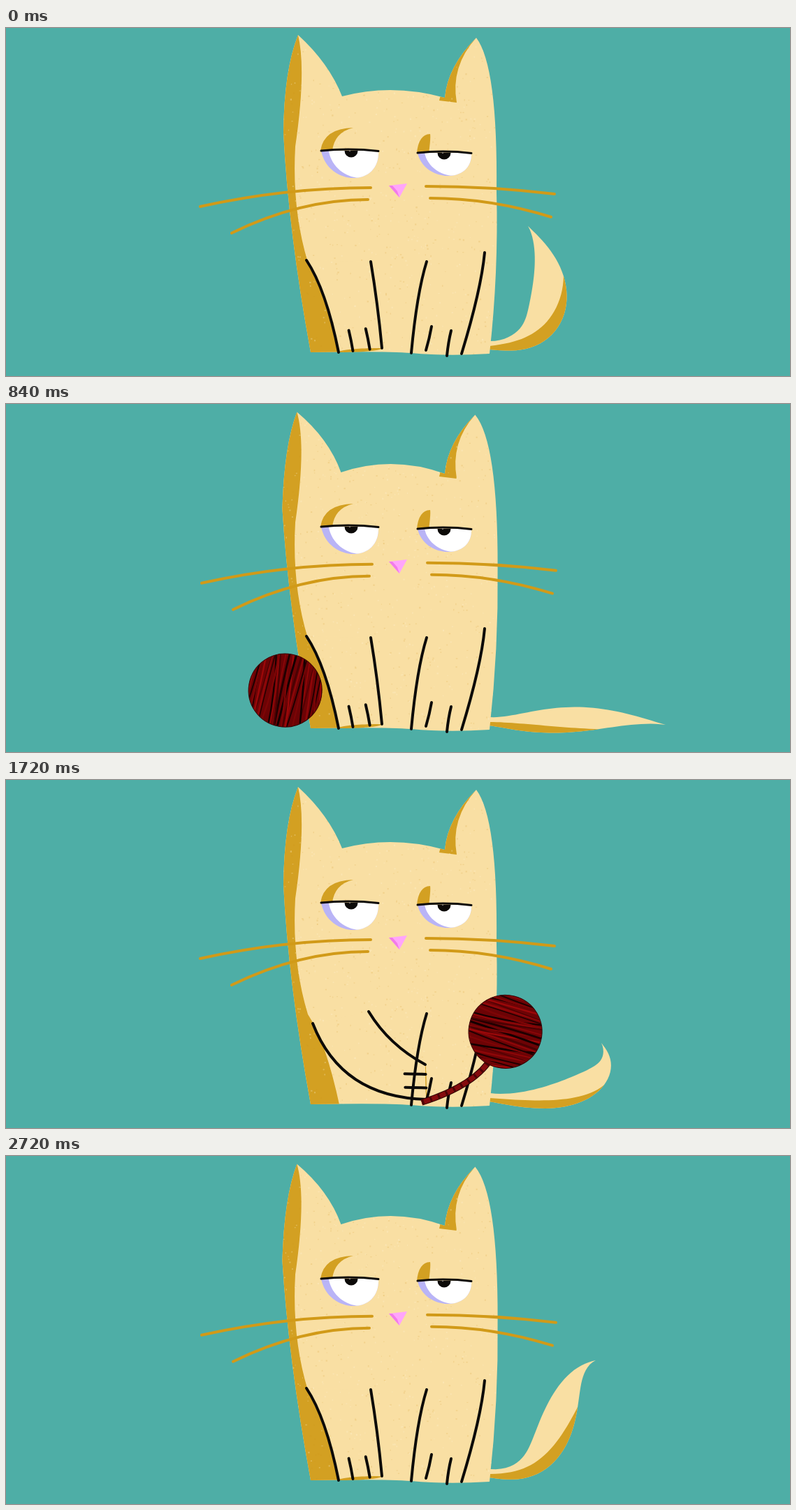
An HTML page with a canvas that plays this animation: 1122 by 499 pixels, repeating every 2800 ms.

```html
<!DOCTYPE html>
<html lang="en">
<head>
<meta charset="utf-8">
<title>Cat and yarn</title>
<style>
html, body { margin: 0; width: 100%; height: 100%; overflow: hidden; background: #4eaea6; }
canvas { display: block; width: 100vw; height: 100vh; }
</style>
</head>
<body>
<canvas id="stage" width="1122" height="499"></canvas>
<script>
const ctx = document.getElementById('stage').getContext('2d');
const LOOP = 2800, STEP = 40;
const TEAL = '#4eaea6', CREAM = '#f9dfa3', OCHRE = '#d3a022', INK = '#0c0a08';

// ---------- helpers ----------
const mix = (a, b, u) => a + (b - a) * u;

function smooth(from, to, t) {
  const u = Math.min(1, Math.max(0, (t - from) / (to - from)));
  return u * u * (3 - 2 * u);
}

function random(seed) {
  return () => {
    seed = (seed * 16807) % 2147483647;
    return seed / 2147483647;
  };
}

// Blend between poses given as [time, numbers].
function blend(keys, t, ease) {
  let i = 0;
  while (i < keys.length - 2 && t >= keys[i + 1][0]) i++;
  const [t0, a] = keys[i], [t1, b] = keys[i + 1];
  const u = ease ? smooth(t0, t1, t) : (t - t0) / (t1 - t0);
  return a.map((v, n) => mix(v, b[n], u));
}

function fill(path, color) {
  ctx.fillStyle = color;
  ctx.fill(path);
}

function stroke(path, color, width, cap = 'round') {
  ctx.strokeStyle = color;
  ctx.lineWidth = width;
  ctx.lineCap = cap;
  ctx.stroke(path);
}

function disc(x, y, r) {
  const path = new Path2D();
  path.arc(x, y, r, 0, 2 * Math.PI);
  return path;
}

function polygon(pts) {
  const path = new Path2D();
  pts.forEach(p => path.lineTo(...p));
  path.closePath();
  return path;
}

function clipped(path, draw) {
  ctx.save();
  ctx.clip(path);
  draw();
  ctx.restore();
}

// ---------- tail ----------
// A cubic spine from a fixed root: two handles, tip, thickness.
const ROOT = [692, 455];
const TAIL = {
  curl: [800, 460, 790, 340, 747, 284, 23],
  hook: [790, 470, 885, 430, 852, 377, 16],
  drop: [770, 462, 925, 470, 928, 418, 16],
  flat: [760, 462, 850, 440, 944, 460, 15],
  lift: [790, 470, 800, 310, 915, 379, 29],
  rise: [810, 470, 775, 315, 856, 294, 21]
};
const WAG = 1480;

// The tail falls, rests, and rises again in time for the end of the wag.
function tailPose(t) {
  const start = t < WAG ? 0 : WAG, end = t < WAG ? WAG : LOOP;
  return blend([
    [start, TAIL.curl], [start + 240, TAIL.hook], [start + 320, TAIL.drop],
    [start + 480, TAIL.flat], [end - 400, TAIL.flat], [end - 240, TAIL.lift],
    [end - 90, TAIL.rise], [end, TAIL.curl]
  ], t);
}

function drawTail(t) {
  const [ax, ay, bx, by, cx, cy, thick] = tailPose(t);
  const SHADE_END = 0.65, N = 40;
  const upper = [], lower = [], shadeIn = [], shadeOut = [];
  for (let i = 0; i <= N; i++) {
    const u = i / N, v = 1 - u;
    const at = (p, a, b, c) => v * v * v * p + 3 * v * v * u * a + 3 * v * u * u * b + u * u * u * c;
    const slope = (p, a, b, c) => v * v * (a - p) + 2 * v * u * (b - a) + u * u * (c - b);
    const x = at(ROOT[0], ax, bx, cx), y = at(ROOT[1], ay, by, cy);
    const dx = slope(ROOT[0], ax, bx, cx), dy = slope(ROOT[1], ay, by, cy);
    const len = Math.hypot(dx, dy);
    const off = d => [x + dy / len * d, y - dx / len * d];
    const half = 6 * v + thick * Math.sin(Math.PI * u) ** 1.4;
    upper.push(off(half));
    lower.unshift(off(-half));
    if (u <= SHADE_END) {
      const s = u / SHADE_END;
      shadeOut.unshift(off(-half - 2));
      shadeIn.push(off(-half + 5 * (1 - s) + (thick - 7) * Math.sin(Math.PI * s)));
    }
  }
  const outline = polygon([...upper, ...lower]);
  fill(outline, CREAM);
  clipped(outline, () => fill(polygon([...shadeIn, ...shadeOut]), OCHRE));
}

// ---------- near leg ----------
// Two bent edges, each as hip, bend and paw; last number is how far the sole shows.
const LEG = {
  rest: [430, 333, 458, 375, 476, 465, 522, 335, 532, 395, 538, 459, 0],
  kick: [434, 323, 395, 365, 293, 393, 507, 362, 425, 418, 322, 465, 1],
  reach: [439, 349, 480, 455, 602, 458, 519, 332, 548, 380, 600, 408, 0]
};
const LEG_KEYS = [
  [0, LEG.rest], [920, LEG.rest], [1120, LEG.kick], [1240, LEG.kick], [1420, LEG.rest],
  [1560, LEG.reach], [1720, LEG.reach], [2000, LEG.rest], [LOOP, LEG.rest]
];

function fillLeg([ax, ay, bx, by, cx, cy, dx, dy, ex, ey, fx, fy, sole]) {
  fill(new Path2D(`M${ax} ${ay}Q${bx} ${by} ${cx} ${cy}L${fx} ${fy}Q${ex} ${ey} ${dx} ${dy}`), CREAM);
  const k = 8 * sole;
  fill(new Path2D(`M${cx} ${cy}C${cx - k} ${cy + 5 * k} ${cx - k} ${fy} ${fx} ${fy}
    C${fx + k} ${fy - 3 * k} ${fx + k} ${cy + k} ${cx} ${cy}`), OCHRE);
}

function strokeLeg([ax, ay, bx, by, cx, cy, dx, dy, ex, ey, fx, fy, sole]) {
  const lines = new Path2D(`M${ax} ${ay}Q${bx} ${by} ${cx} ${cy}M${dx} ${dy}Q${ex} ${ey} ${fx} ${fy}`);
  // toes run back along the leg
  const back = (30 + 18 * sole) / Math.hypot(bx - cx, by - cy);
  for (const u of [0.33 - 0.15 * sole, 0.72 - 0.2 * sole]) {
    const x = mix(cx, fx, u), y = mix(cy, fy, u);
    lines.moveTo(x, y);
    lines.quadraticCurveTo(x + (bx - cx) * back * 0.4, y + (by - cy) * back * 0.5,
      x + (bx - cx) * back, y + (by - cy) * back);
  }
  stroke(lines, INK, 4);
}

// ---------- body ----------
const FAR_LEG = new Path2D(`M602 335Q588 380 580 466M609 428Q606 445 601 462
  M637 434Q633 450 631 470M685 322Q680 375 652 467`);

// `boil` picks one of three slightly different drawings.
function drawBody(boil, leg) {
  const s = [0, 1.6, 0.8][boil], crown = boil ? 73 : 79;
  const left = `${418 - s} ${10 + s}`, right = `${673 - s} ${14 + s}`;
  const earBase = `${481 - s} 98`;
  const outline = new Path2D(`M${left}Q462 50 ${earBase}Q553 ${crown} 628 100Q632 55 ${right}
    Q704 55 ${702 + s} 235Q705 350 692 467Q630 471 580 466Q540 463 436 465
    Q404 290 ${397 - s} 150Q398 60 ${left}`);
  const earShade = new Path2D(`M620 104Q630 55 ${right}Q636 55 645 107Z`);
  const sideShade = new Path2D(`M${left}Q430 60 414 170Q409 260 432 336Q458 375 478 470
    L380 470V10Z`);
  fill(outline, CREAM);
  clipped(outline, () => {
    fill(sideShade, OCHRE);
    fill(earShade, OCHRE);
  });
  fillLeg(leg);
  clipped(outline, () => {
    const rnd = random(91 + boil * 557);
    for (let i = 0; i < 800; i++) {
      ctx.fillStyle = i % 2 ? 'rgba(205,145,30,.16)' : 'rgba(255,244,214,.28)';
      ctx.fillRect(395 + rnd() * 310, 10 + rnd() * 460, 1 + rnd() * 1.5, 1 + rnd() * 1.5);
    }
  });
  stroke(FAR_LEG, INK, 4);
  strokeLeg(leg);
}

// ---------- face ----------
function drawEye(x, y, w, h, pupil) {
  const bowl = dx => new Path2D(`M${x + dx} ${y}C${x + dx + 0.12 * w} ${y + 1.3 * h}
    ${x + dx + 1.03 * w} ${y + 1.37 * h} ${x + dx + w} ${y}Z`);
  fill(bowl(0), '#b9b4f6');
  clipped(bowl(0), () => fill(bowl(0.13 * w), '#fff'));
  const half = new Path2D();
  half.arc(pupil, y, 9.5, 0, Math.PI);
  fill(half, INK);
  stroke(new Path2D(`M${x} ${y}Q${x + w / 2} ${y - 4} ${x + w} ${y + 0.5}`), INK, 3);
  fill(disc(pupil - 2, y, 1.2), '#77706a');
}

function drawBrow(x, y, w, h) {
  fill(new Path2D(`M${x} ${y}Q${x + 0.1 * w} ${y - 0.97 * h} ${x + w} ${y - h}
    Q${x + 20} ${y - 0.8 * h} ${x + 17} ${y}Z`), OCHRE);
}

// A whisker leaves the cheek level, then droops.
function drawWhisker(x, y, tipX, tipY) {
  stroke(new Path2D(`M${x} ${y}Q${(x + tipX) / 2} ${y} ${tipX} ${tipY}`), '#d19a18', 4);
}

function drawFace(boil) {
  drawBrow(450, 176, 47, 33);
  drawBrow(588, 180, 19, 28);
  drawEye(451, 176, 82, 39, 494);
  drawEye(589, 179, 77, 33, 627);
  fill(new Path2D('M548 226L574 223L563 243Z'), '#ffa5fb');
  fill(new Path2D('M548 226L553 226L560 234L563 243Z'), '#f27be9');

  ctx.save();
  if (boil) ctx.translate(2, 0.7);
  drawWhisker(522, 229, 278, 256);
  drawWhisker(518, 246, 323, 294);
  drawWhisker(601, 227, 785, 238);
  drawWhisker(607, 244, 780, 271);
  ctx.restore();
}

// ---------- yarn ----------
const R = 52.5, KICK = 1240;

// Rolls in and slows down, gets nudged forward, then is batted away to the right.
function ballAt(t) {
  const roll = Math.min(t, KICK), nudge = smooth(980, 1180, t);
  const flight = Math.max(0, (t - KICK) / 480), air = Math.max(0, flight - 0.65);
  const hop = 424 * Math.exp(-(roll - 80) / 150) * Math.abs(Math.sin(Math.PI * (420 - roll) / 400));
  return {
    x: 423 - 204 * Math.exp((320 - roll) / 240) + 17 * nudge + 279 * flight ** 1.5,
    y: 411 - hop + 33 * nudge - 304 * air + 190 * air * air
  };
}

function drawYarn(t) {
  const { x, y } = ballAt(t);
  const speed = (x - ballAt(t - 20).x) / 20;
  const turn = (0.67 * (Math.min(x, 436) - 250) + 0.25 * Math.max(0, x - 436)) * Math.PI / 180;
  ctx.save();
  ctx.translate(x, y);

  // the loose end turns with the ball, drags behind it and lies on the floor
  const reel = 1 - smooth(400, 600, t) + smooth(1000, 1200, t);
  const length = 40 + 75 * reel, drag = 76 * speed * reel;
  const angle = turn - 1.33;
  const point = (r, lag) => {
    const py = Math.sin(angle) * r;
    return `${Math.cos(angle) * r - lag} ${Math.min(py, t < KICK + STEP ? 49 : 105)}`;
  };
  const string = new Path2D(`M${point(40, 0)}Q${point(length * 0.75, 0)} ${point(length, drag)}`);
  stroke(string, '#2a0202', 9, 'butt');
  stroke(string, '#850b0d', 7, 'butt');
  ctx.setLineDash([3, 9]);
  stroke(string, '#4c0305', 7, 'butt');
  ctx.setLineDash([]);

  ctx.rotate(turn);
  const ball = disc(0, 0, R);
  fill(ball, '#6d0305');
  clipped(ball, () => {
    const rnd = random(4177);
    const tones = ['#210001', '#8f0709', '#4a0203', '#9c0809', '#140000', '#7d0506'];
    for (let i = 0; i < 34; i++) {
      const h = -60 + i * 3.6, tilt = (rnd() - 0.5) * 16;
      stroke(new Path2D(`M-56 ${h + tilt}Q${rnd() * 40 - 20} ${h - 6 + rnd() * 9} 56 ${h - tilt}`),
        tones[i % tones.length], 1.2 + rnd() * 1.8);
    }
  });
  stroke(ball, '#3a0203', 1);
  ctx.restore();
}

// ---------- loop ----------
function draw(now) {
  const step = Math.floor((now % LOOP) / STEP), t = step * STEP;
  const boil = Math.floor(step / 2) % 3;
  ctx.lineJoin = 'round';
  ctx.fillStyle = TEAL;
  ctx.fillRect(0, 0, 1122, 499);
  drawTail(t);
  drawBody(boil, blend(LEG_KEYS, t, true));
  drawFace(boil);
  drawYarn(t);
}

const start = performance.now();
function tick() {
  draw(performance.now() - start);
  requestAnimationFrame(tick);
}
tick();
</script>
</body>
</html>
```
